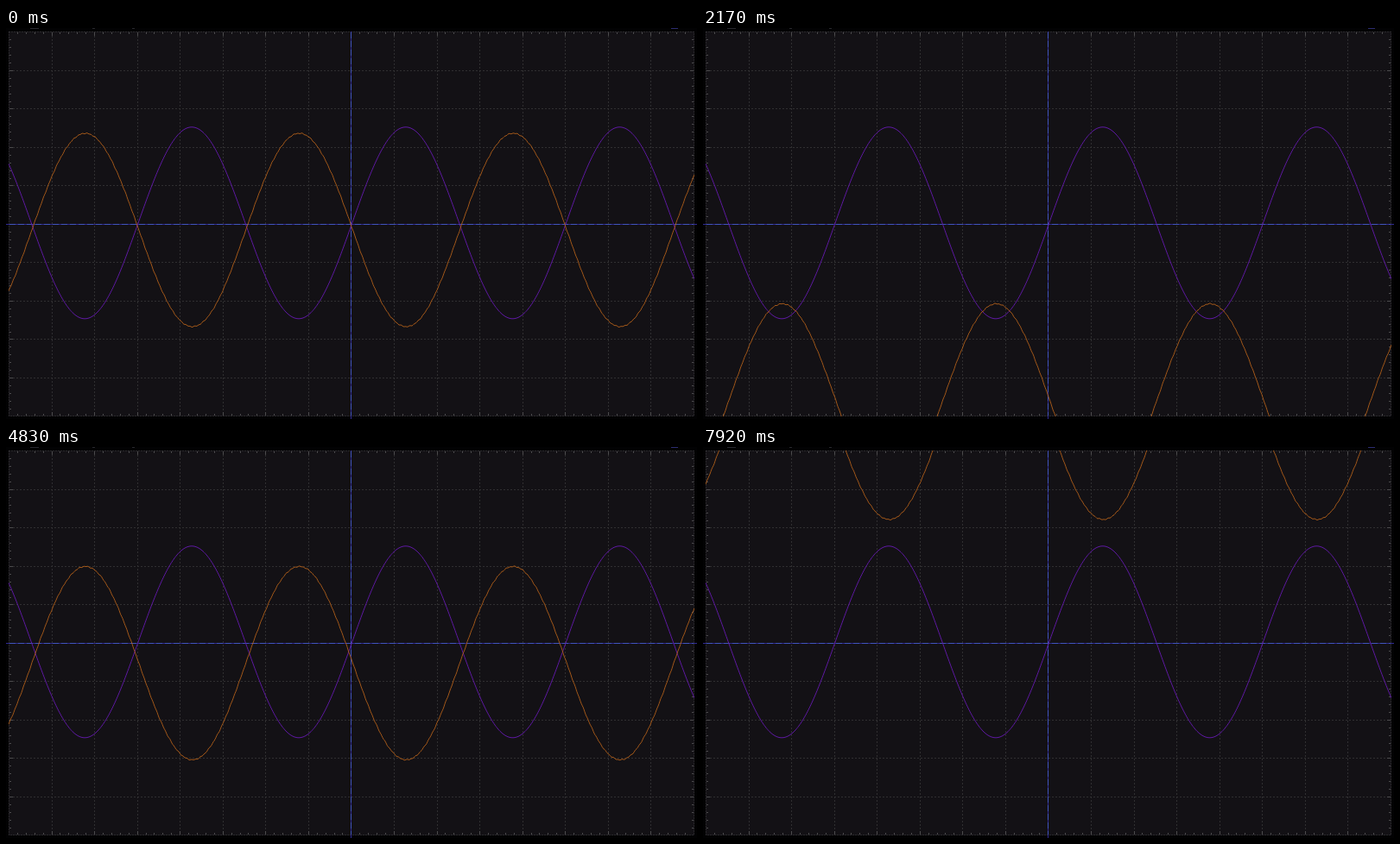
Animation, 800 px wide and 453 px high, one loop 8000 ms. Source, as an HTML page:

```html
<!DOCTYPE html>
<html lang="en">
<head>
<meta charset="utf-8">
<title>Oscilloscope</title>
<style>
  html, body { margin: 0; width: 100%; height: 100%; overflow: hidden; background: #000; }
  svg { display: block; width: 100%; height: 100%; }
  path { fill: none; }
</style>
</head>
<body>
<svg viewBox="0 0 800 453">
  <defs><clipPath id="screen"><rect x="3" y="4" width="794" height="446"/></clipPath></defs>
  <rect width="800" height="453" fill="#020203"/>
  <rect x="3" y="4" width="794" height="446" fill="#131115"/>
  <path d="M28 .5H38M100 .5H103M146 .5H149" stroke="#28282e"/>
  <path d="M770 .5H778" stroke="#2c2c70"/>
  <path id="grid" stroke="#302f31" stroke-dasharray="2 2"/>
  <path d="M3.5 4.5H796.5V449.5H3.5Z" stroke="#414042" stroke-dasharray="1 2"/>
  <path id="ticks" stroke="#4c4b4d"/>
  <path d="M0 227.5H800M399.5 4V453" stroke="#302a90"/>
  <path d="M4 227.5H796M399.5 5V449" stroke="#4054bc" stroke-dasharray="7 3"/>
  <g clip-path="url(#screen)" stroke-linejoin="round">
    <path id="violet" stroke="#621aaa" stroke-width=".95"/>
    <path id="orange" stroke="#bc651b" stroke-width=".85"/>
  </g>
</svg>
<script>
const LOOP = 8000, STEP = 1000 / 12, PERIOD = 247.7;
const $ = id => document.getElementById(id);

// Vertical centre of the orange trace: [ms, y]
const knob = [
  [0, 234], [1080, 257], [2080, 431.5], [3080, 431], [3600, 430.5], [4250, 382],
  [4833, 250.5], [5000, 197], [5500, 134], [5830, 131], [5920, 131], [7500, -28], [8000, -28]
];

const slopes = knob.map((_, i) => {
  if (!i || i === knob.length - 1) return 0;
  const rate = k => (knob[k + 1][1] - knob[k][1]) / (knob[k + 1][0] - knob[k][0]);
  const a = rate(i - 1), b = rate(i);
  return a * b > 0 ? 2 * a * b / (a + b) : 0;
});

// Monotone cubic through the knob positions
function centreAt(t) {
  let i = 0;
  while (i < knob.length - 2 && t >= knob[i + 1][0]) i++;
  const [t0, y0] = knob[i], [t1, y1] = knob[i + 1];
  const d = t1 - t0, u = (t - t0) / d, v = 1 - u;
  return v * v * ((1 + 2 * u) * y0 + u * d * slopes[i]) +
         u * u * ((1 + 2 * v) * y1 - v * d * slopes[i + 1]);
}

function trace(y) {
  let d = '';
  for (let x = 3; x <= 797; x++) d += (d ? 'L' : 'M') + x + ' ' + y(x).toFixed(2);
  return d;
}

const wave = (x, zero) => Math.sin(2 * Math.PI * (x - zero) / PERIOD);
const ripple = (x, n) => 0.4 * Math.sin(x * 1.26 + n * 1.7) + 0.25 * Math.sin(x * 0.71 + n * 2.3);

function drawGrid() {
  const snap = v => Math.round(v) + 0.5;
  let grid = '', ticks = '';
  for (let i = 1; i < 16; i++) if (i !== 8) grid += `M${snap(3 + i * 49.55)} 5V449`;
  for (let i = 1; i < 10; i++) if (i !== 5) grid += `M4 ${snap(4.4 + i * 44.5)}H796`;
  for (let i = 1; i < 80; i++) {
    const x = snap(3 + i * 9.91), n = i % 5 ? 2 : 4;
    ticks += `M${x} 5v${n}M${x} 449v${-n}`;
  }
  for (let i = 1; i < 50; i++) {
    const y = snap(4.4 + i * 8.9), n = i % 5 ? 2 : 4;
    ticks += `M4 ${y}h${n}M796 ${y}h${-n}`;
  }
  $('grid').setAttribute('d', grid);
  $('ticks').setAttribute('d', ticks);
}

function draw(ms) {
  const n = Math.floor((ms % LOOP + 4) / STEP) % 96;
  const centre = centreAt(n * STEP);
  $('orange').setAttribute('d', trace(x => centre + 112 * wave(x, 401.5) + ripple(x, n)));
}

drawGrid();
$('violet').setAttribute('d', trace(x => 225.8 - 111 * wave(x, 400.8)));
draw(0);

let start;
function tick(now) {
  start ??= now;
  draw(now - start);
  requestAnimationFrame(tick);
}
requestAnimationFrame(tick);
</script>
</body>
</html>
```
